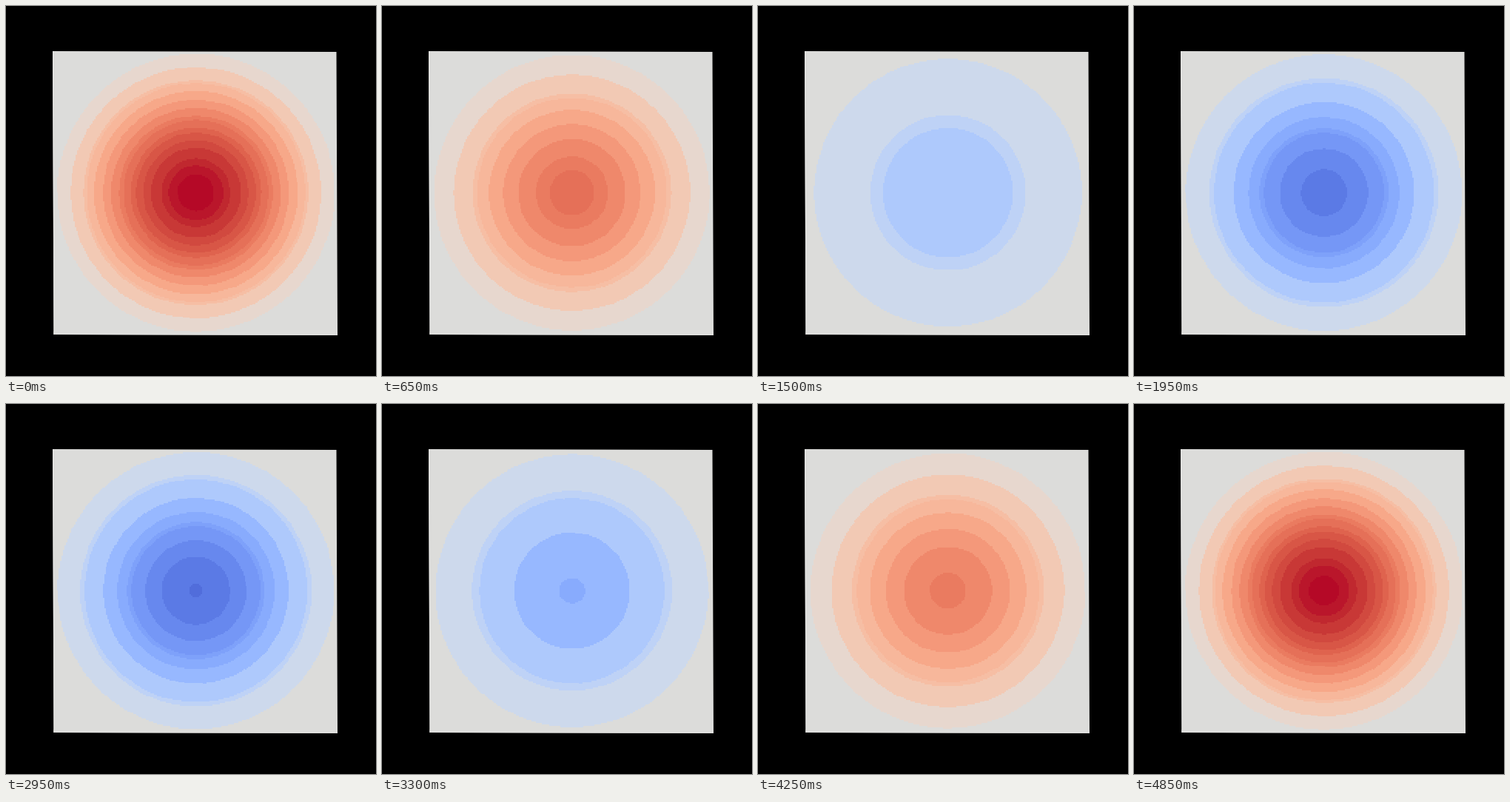
A matplotlib script that plays this animation: 500 px wide and 500 px high, repeating every 5 s.

```python
import numpy as np
import matplotlib.pyplot as plt
from matplotlib.animation import FuncAnimation
from matplotlib.patches import Polygon

SIZE = 500
FRAMES = 100
CELLS = 200
RADIUS = 191.0
CENTER = (256.7, 252.3)
FIRST_ZERO = 2.404826

# membrane sheet seen from above: one corner and two edge vectors
ORIGIN = np.array([63.0, 61.0])
ACROSS = np.array([383.5, 1.0])
DOWN = np.array([1.5, 383.0])

POSITIVE = [0.0225, 0.149, 0.275, 0.304, 0.381, 0.467, 0.545, 0.616, 0.654,
            0.716, 0.756, 0.810, 0.859, 0.917, 0.9465, 0.976]
NEGATIVE = [0.0225, 0.199, 0.235, 0.386, 0.494, 0.567, 0.594, 0.679, 0.756,
            0.821, 0.875, 0.920, 0.965]


def bessel_j0(x):
    theta = (np.arange(64) + 0.5) * np.pi / 64
    return np.cos(np.outer(x, np.sin(theta))).mean(axis=1)


def band_colors(levels, sign):
    edges = np.array(levels + [1.0])
    mids = (edges[:-1] + edges[1:]) / 2
    return plt.get_cmap("coolwarm")(0.5 + sign * mids / 2)[:, :3]


def mode_shape():
    """Static mode on the pixel grid, stepped by mesh cell."""
    y, x = np.mgrid[0:SIZE, 0:SIZE] + 0.5
    basis = np.linalg.inv(np.column_stack([ACROSS, DOWN]))
    dx, dy = x - ORIGIN[0], y - ORIGIN[1]
    u = basis[0, 0] * dx + basis[0, 1] * dy
    v = basis[1, 0] * dx + basis[1, 1] * dy
    u = (np.floor(u * CELLS) + 0.5) / CELLS
    v = (np.floor(v * CELLS) + 0.5) / CELLS
    px = ORIGIN[0] + u * ACROSS[0] + v * DOWN[0]
    py = ORIGIN[1] + u * ACROSS[1] + v * DOWN[1]
    r = np.hypot(px - CENTER[0], py - CENTER[1]) / RADIUS
    grid = np.linspace(0, 1, 2000)
    return np.interp(r, grid, bessel_j0(FIRST_ZERO * grid), right=0.0)


SHAPE = mode_shape()
LEVELS = np.array([-v for v in reversed(NEGATIVE)] + POSITIVE)
FLAT = np.array([[220, 220, 218]]) / 255
PALETTE = np.vstack([band_colors(NEGATIVE, -1)[::-1], FLAT,
                     band_colors(POSITIVE, 1)])
PALETTE = np.round(PALETTE * 255).astype(np.uint8)


def picture(i):
    height = np.cos(2 * np.pi * i / (FRAMES - 1))
    return PALETTE[np.digitize(height * SHAPE, LEVELS)]


fig = plt.figure(figsize=(5, 5), dpi=100, facecolor="black")
ax = fig.add_axes([0, 0, 1, 1])
ax.axis("off")

image = ax.imshow(picture(0), extent=(0, SIZE, SIZE, 0),
                  interpolation="nearest", aspect="auto")
ax.set_xlim(0, SIZE)
ax.set_ylim(SIZE, 0)

corners = [ORIGIN, ORIGIN + ACROSS, ORIGIN + ACROSS + DOWN, ORIGIN + DOWN]
image.set_clip_path(Polygon(corners, transform=ax.transData))


def strip(points, color):
    ax.add_patch(Polygon(points, facecolor=color, edgecolor="none", zorder=3))


left, bottom = np.array([1.0, 0.0]), np.array([0.0, -4.0])
strip([corners[0], corners[0] + left, corners[3] + left, corners[3]], "#e8e8e6")
strip([corners[3] + bottom, corners[2] + bottom, corners[2], corners[3]], "#dededc")


def update(i):
    image.set_data(picture(i))
    return (image,)


anim = FuncAnimation(fig, update, frames=FRAMES, interval=50,
                     repeat=True, repeat_delay=0, blit=False)
plt.show()
```
